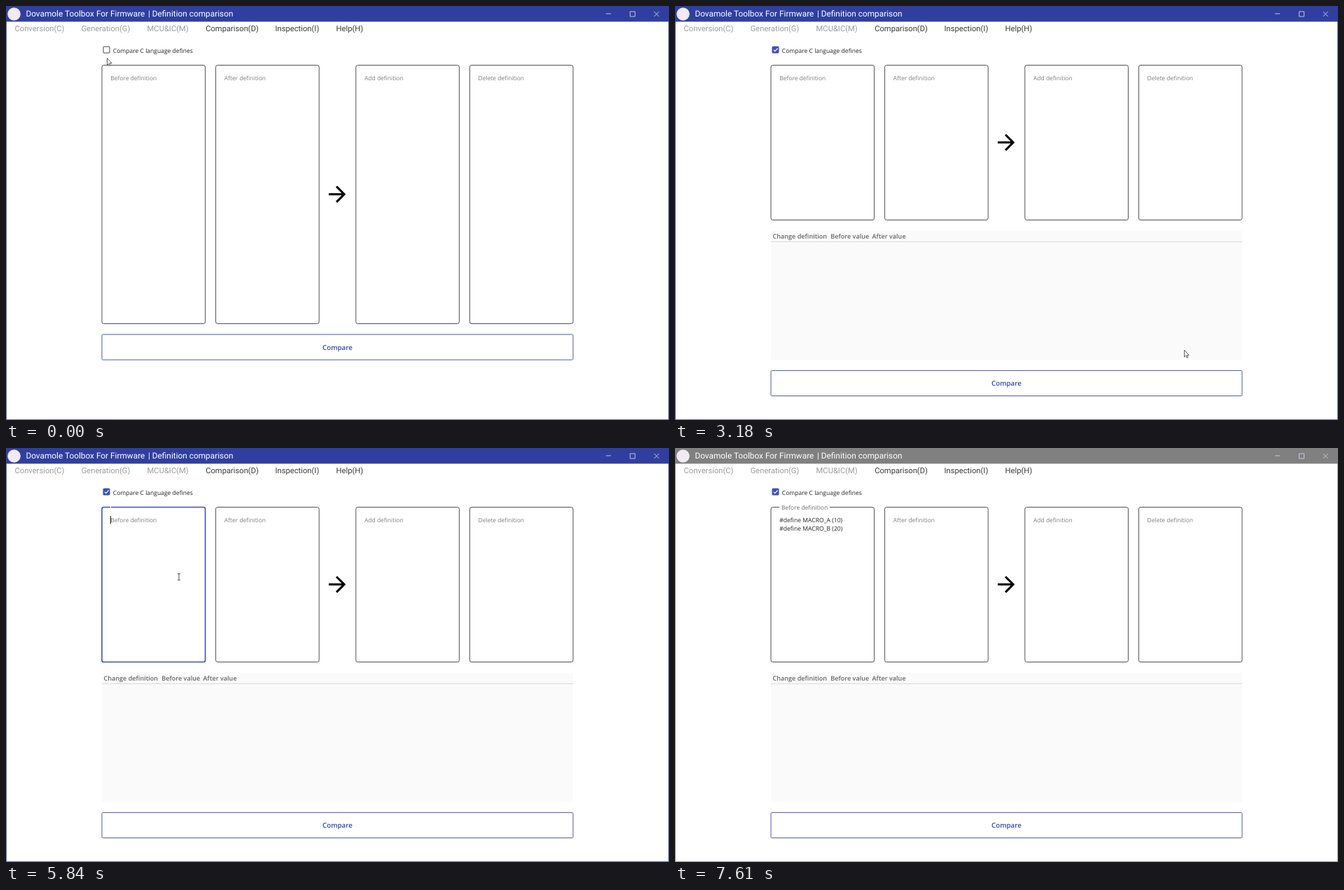
These frames come from a looping animation (947x591 px, 8000 ms). An HTML page:

```html
<!DOCTYPE html>
<html lang="en">
<head>
<meta charset="utf-8">
<title>Definition comparison</title>
<style>
  html, body { margin: 0; width: 100%; height: 100%; overflow: hidden; background: #fff; }
  svg { display: block; width: 947px; height: 591px; --chrome: #303f9f; --accent: #3f51b5; }
  svg.inactive { --chrome: #808080; }
  text { font-family: "Open Sans", "Noto Sans", sans-serif; font-size: 8.46px; text-rendering: geometricPrecision; white-space: pre; }
  .title { font-family: Roboto, sans-serif; font-size: 11.85px; fill: #fff; }
  .menu { font-family: Roboto, sans-serif; font-size: 11.2px; fill: #3a3a3a; }
  .menu .off { fill: #9b9b9b; }
  .frame { fill: none; stroke: var(--chrome); stroke-opacity: .8; }
  .controls { fill: none; stroke: #cdd1e8; stroke-width: .9; }
  .field { fill: none; stroke: #505050; }
  .field.focus { stroke: var(--accent); stroke-width: 1.6; }
  .hint { fill: #7d7d7d; }
  .option { font-size: 8.54px; fill: #222; }
  .code { font-size: 8.6px; fill: #222; }
  .head { font-size: 9.08px; font-weight: 600; fill: #666; }
  .button { fill: #fff; stroke: #4a59b3; }
  .action { font-size: 9.75px; font-weight: 600; fill: #3546a3; text-anchor: middle; }
</style>
</head>
<body>
<svg id="stage" viewBox="0 0 947 591">
  <rect width="947" height="591" fill="#fff"/>
  <rect class="frame" x=".5" y=".5" width="946" height="590"/>
  <rect width="947" height="22.4" fill="var(--chrome)"/>
  <circle cx="11.5" cy="11.5" r="9.3" fill="#f1e9f3"/>
  <text class="title" x="28.4" y="15">Dovamole Toolbox For Firmware</text>
  <text class="title" x="202.9" y="15">| Definition comparison</text>
  <path class="controls" d="M857 11h7M891.5 8h7v7h-7zM925.7 8l7 7m0-7l-7 7"/>
  <g class="menu">
    <text class="menu off" x="12.5" y="35.6">Conversion(C)</text>
    <text class="menu off" x="107.7" y="35.6">Generation(G)</text>
    <text class="menu off" x="201.6" y="35.6">MCU&amp;IC(M)</text>
    <text class="menu" x="285.2" y="35.6">Comparison(D)</text>
    <text class="menu" x="384.5" y="35.6">Inspection(I)</text>
    <text class="menu" x="471.6" y="35.6">Help(H)</text>
  </g>

  <rect id="box" x="139" y="58" width="9" height="9" rx=".8"/>
  <path id="tick" d="M140.8 62.6l2 2.1 3.8-4.2" fill="none" stroke="#fff" stroke-width="1.2"/>
  <text class="option" x="152.8" y="66.7">Compare C language defines</text>

  <g id="table">
    <rect x="137" y="321" width="673" height="184" fill="#fafafa"/>
    <path d="M137 336.5h673" stroke="#d9d9d9"/>
    <text class="head" x="139.5" y="332.3">Change definition</text>
    <text class="head" x="222.2" y="332.3">Before value</text>
    <text class="head" x="281.6" y="332.3">After value</text>
  </g>

  <g id="fields"></g>
  <rect id="gap" x="149" y="82" height="5" fill="#fff"/>
  <text id="label">Before definition</text>
  <g id="code">
    <text class="code" x="149.2" y="106">#define MACRO_A (10)</text>
    <text class="code" x="149.2" y="117.7">#define MACRO_B (20)</text>
  </g>
  <rect id="caret" width="1" height="11.5" fill="#222"/>

  <path id="arrow" d="M12 4l-1.41 1.41L16.17 11H4v2h12.17l-5.58 5.59L12 20l8-8z"/>
  <g id="compare">
    <rect class="button" x="137" width="673" height="36.2" rx="1.5"/>
    <text class="action" x="473.5" y="22">Compare</text>
  </g>

  <g id="cursor">
    <path id="pointer" d="M.5.5V10.2L2.7 8.2L4.2 11.5L5.7 10.8L4.2 7.6H7.2Z" fill="#fff" stroke="#333" stroke-width=".8"/>
    <path id="beam" d="M-2-4.5h1.5l.5.5.5-.5H2M0-4V4M-2 4.5h1.5l.5-.5.5.5H2" fill="none" stroke="#333" stroke-width=".9"/>
  </g>
</svg>
<script>
const LOOP = 8000;
const OPENED = 1440, FOCUS = 5840, PASTE = 6380, BLUR = 7480;
const FIELD_WIDTH = 147.6;
const $ = id => document.getElementById(id);
const set = (el, attrs) => { for (const key in attrs) el.setAttribute(key, attrs[key]); };
const show = (el, on) => set(el, { visibility: on ? "visible" : "hidden" });
const clamp = v => Math.max(0, Math.min(1, v));
const smooth = p => p * p * (3 - 2 * p);
const mix = (a, b, p) => a + (b - a) * p;

const columns = [137, 299.6, 499.8, 662.4];
const hints = ["", "After definition", "Add definition", "Delete definition"];
const svgNode = (tag, attrs) => {
  const el = document.createElementNS("http://www.w3.org/2000/svg", tag);
  set(el, attrs);
  return $("fields").appendChild(el);
};
const fields = columns.map((x, i) => {
  svgNode("text", { class: "hint", x: x + 12.2, y: 106 }).textContent = hints[i];
  return svgNode("rect", { class: "field", x, y: 84.5, width: FIELD_WIDTH, rx: 2.6 });
});

// Each move: start time, number of positions, time per position, first and last point
const moves = [
  { at: 0, n: 1, dt: 1, from: [144, 74], to: [144, 74] },
  { at: 770, n: 4, dt: 70, from: [144, 73], to: [144, 66] },
  { at: 2640, n: 12, dt: 67.2, from: [154, 69], to: [855, 585] },
  { at: 5300, n: 8, dt: 67.2, from: [584, 573], to: [247, 184] },
  { at: 6380, n: 6, dt: 70, from: [247, 184], to: [660, 533] }
];

function cursorAt(t) {
  const { at, n, dt, from, to } = moves.findLast(m => t >= m.at);
  const step = Math.min(n - 1, Math.floor((t - at) / dt));
  const p = n > 1 ? smooth(step / (n - 1)) : 0;
  return from.map((v, i) => mix(v, to[i], p));
}

function drawCursor(t, height) {
  const [x, y] = cursorAt(t);
  const visible = t < 3460 || (t >= 5300 && t < 6800);
  const overField = y > 85 && y < 84 + height && columns.some(c => x > c && x < c + FIELD_WIDTH);
  set($("cursor"), { transform: `translate(${x} ${y})` });
  show($("pointer"), visible && !overField);
  show($("beam"), visible && overField);
}

function drawLabel(t) {
  const p = 1 - (1 - clamp((t - FOCUS) / 200)) ** 3;
  const tint = t < 7610 ? p : 0;
  const rest = t < BLUR ? 125 : 105;
  const color = [63, 81, 181].map(c => Math.round(mix(rest, c, tint)));
  set($("label"), { x: mix(149.2, 152, p), y: mix(106, 88, p), fill: `rgb(${color})` });
  set($("gap"), { width: 72 * p });
}

function draw(t) {
  const open = t >= OPENED;
  const focused = t >= FOCUS && t < BLUR;
  const pasted = t >= PASTE;
  const height = open ? 221 : 369;

  $("stage").classList.toggle("inactive", t >= BLUR || (t >= 4240 && t < FOCUS));
  set($("box"), {
    fill: open ? "#3f51b5" : t >= 1310 ? "#cfcfcf" : "#fff",
    stroke: open ? "#3f51b5" : "#444"
  });
  show($("tick"), open);
  show($("table"), open);
  fields.forEach(f => set(f, { height }));
  fields[0].classList.toggle("focus", focused);
  set($("arrow"), { transform: `translate(454.9 ${open ? 176.6 : 250.5}) scale(1.52)` });
  set($("compare"), { transform: `translate(0 ${open ? 520.4 : 468.9})` });

  drawLabel(t);
  show($("code"), pasted);
  set($("caret"), pasted ? { x: 238.8, y: 108 } : { x: 149, y: 97 });
  show($("caret"), focused && t < 7020);
  drawCursor(t, height);
}

const start = performance.now();
function tick() {
  draw((performance.now() - start) % LOOP);
  requestAnimationFrame(tick);
}
tick();
</script>
</body>
</html>
```
